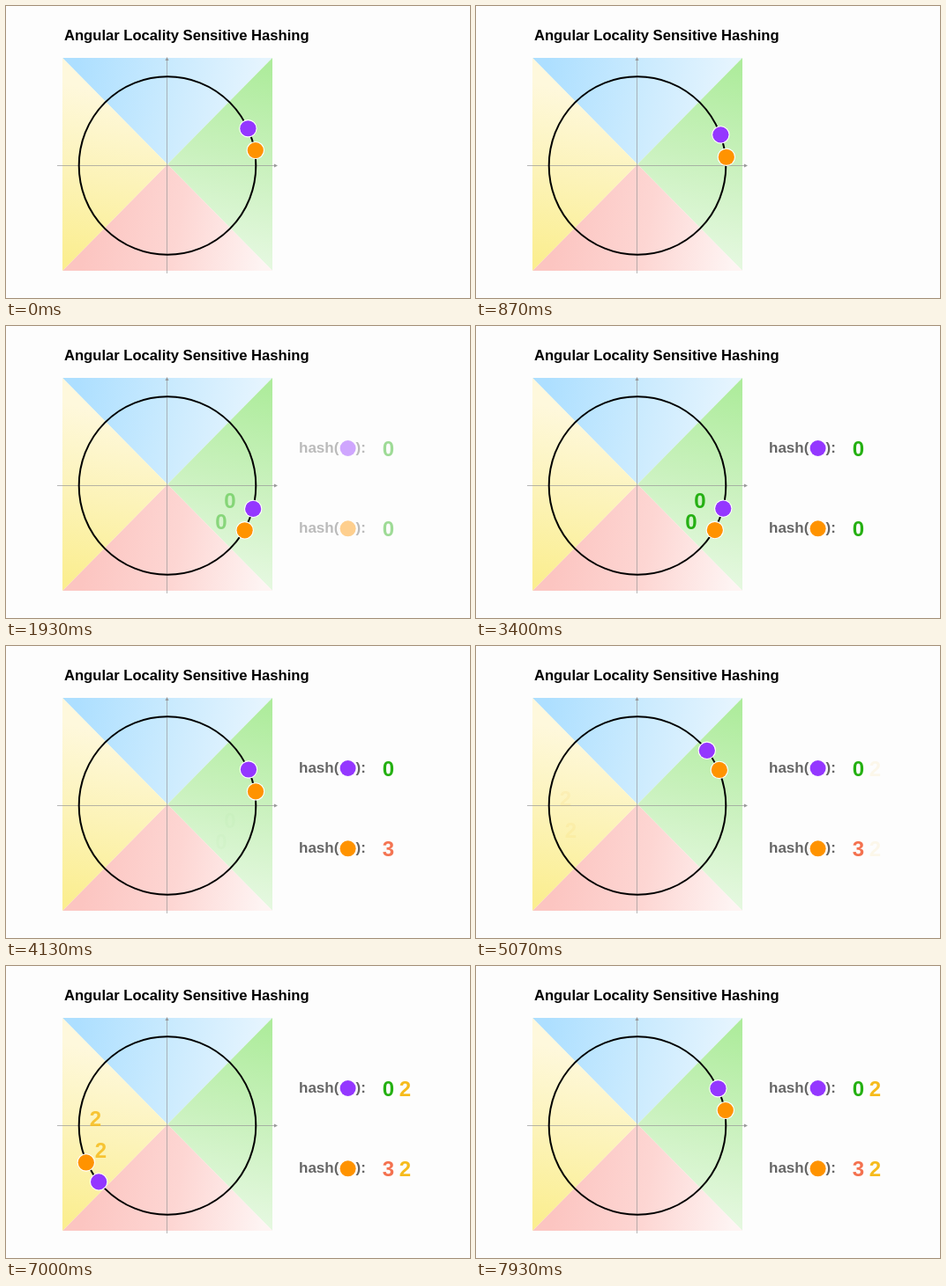
Animation of 526 by 332 pixels, one loop 8000 ms. Source, as an HTML page with a canvas:

```html
<!DOCTYPE html>
<html lang="en">
<head>
<meta charset="utf-8">
<title>Angular Locality Sensitive Hashing</title>
<style>
html, body { margin: 0; width: 100%; height: 100%; overflow: hidden; background: #fdfdfd; }
canvas { display: block; width: 526px; height: 332px; }
</style>
</head>
<body>
<canvas id="stage"></canvas>
<script>
const W = 526, H = 332, LOOP = 8000;
const CX = 183, CY = 181.5;
const PURPLE = '#9437ff', ORANGE = '#ff9300';
const GREEN = '#24b012', RED = '#f4714f', YELLOW = '#f6bb1c';
const FONT = '"Liberation Sans", Arial, sans-serif';

const canvas = document.getElementById('stage');
const ctx = canvas.getContext('2d');
const scale = window.devicePixelRatio || 1;
canvas.width = W * scale;
canvas.height = H * scale;

const clamp = x => Math.min(1, Math.max(0, x));
const ramp = (t, start, length) => clamp((t - start) / length);
const ease = x => x < 0.5 ? 4 * x ** 3 : 1 - 4 * (1 - x) ** 3;
const move = (t, start) => ease(ramp(t, start, 1000));

function sector(a, b, from, to, colors) {
  const g = ctx.createLinearGradient(...from, ...to);
  colors.forEach((c, i) => g.addColorStop(i / (colors.length - 1), c));
  ctx.fillStyle = g;
  ctx.beginPath();
  ctx.moveTo(...a);
  ctx.lineTo(...b);
  ctx.lineTo(183, 180);
  ctx.fill();
}

function text(str, x, y, size, color, alpha = 1, align = 'center') {
  if (alpha <= 0) return;
  ctx.globalAlpha = alpha;
  ctx.font = `bold ${size}px ${FONT}`;
  ctx.textAlign = align;
  ctx.fillStyle = color;
  ctx.fillText(str, x, y);
  ctx.globalAlpha = 1;
}

const digit = (d, x, y, color, alpha) => text(d, x, y, 24, color, alpha);

function disc(x, y, r, color, alpha = 1) {
  ctx.globalAlpha = alpha;
  ctx.beginPath();
  ctx.arc(x, y, r, 0, Math.PI * 2);
  ctx.fillStyle = color;
  ctx.fill();
  ctx.globalAlpha = 1;
}

function orbitDot(deg, r, color) {
  const a = deg * Math.PI / 180;
  const x = CX + r * Math.cos(a), y = CY + r * Math.sin(a);
  disc(x, y, 10.2, '#fff');
  disc(x, y, 9.1, color);
}

function arrow(x, y, dx, dy) {
  ctx.beginPath();
  ctx.moveTo(x, y);
  ctx.lineTo(x - 4 * dx - 2 * dy, y - 4 * dy - 2 * dx);
  ctx.lineTo(x - 4 * dx + 2 * dy, y - 4 * dy + 2 * dx);
  ctx.fill();
}

function drawBoard() {
  const tl = [64, 59], tr = [302, 59], br = [302, 301], bl = [64, 301];
  sector(tl, tr, [80, 70], [285, 105], ['#addfff', '#c9eafe', '#e5f4fe']);
  sector(tr, br, [300, 70], [250, 285], ['#aeec9c', '#c9f1bd', '#e5f8e0']);
  sector(br, bl, [90, 265], [290, 300], ['#fcc5c1', '#fdd6d3', '#fef4f3']);
  sector(bl, tl, [66, 290], [105, 95], ['#fbee90', '#fcf3b8', '#fef8dc']);

  ctx.strokeStyle = ctx.fillStyle = '#999';
  ctx.lineWidth = 0.7;
  ctx.beginPath();
  ctx.moveTo(58, 181.5);
  ctx.lineTo(305, 181.5);
  ctx.moveTo(182.5, 304);
  ctx.lineTo(182.5, 60);
  ctx.stroke();
  arrow(308, 181.5, 1, 0);
  arrow(182.5, 58, 0, -1);

  ctx.strokeStyle = '#000';
  ctx.lineWidth = 2;
  ctx.beginPath();
  ctx.ellipse(CX, CY, 100.3, 101.3, 0, 0, Math.PI * 2);
  ctx.stroke();
}

function hashLabel(y, color, alpha) {
  text('hash(', 332, y + 5, 17, '#666', alpha, 'left');
  text('):', 396.5, y + 5, 17, '#666', alpha, 'left');
  disc(387.6, y, 9, color, alpha);
}

function draw(t) {
  const out1 = move(t, 570), back1 = move(t, 3300);
  const out2 = move(t, 4797), back2 = move(t, 6670);
  const shown = ramp(t, 1500, 980);

  ctx.setTransform(scale, 0, 0, scale, 0, 0);
  ctx.fillStyle = '#fdfdfd';
  ctx.fillRect(0, 0, W, H);
  text('Angular Locality Sensitive Hashing', 66, 39, 16.6, '#000', 1, 'left');
  drawBoard();

  const near1 = shown * (1 - back1), near2 = out2 * (1 - back2);
  digit('0', 254, 207, GREEN, near1);
  digit('0', 244, 231, GREEN, near1);
  digit('2', 101.5, 182, YELLOW, near2);
  digit('2', 107.5, 218, YELLOW, near2);

  // The second trip completes a full counterclockwise turn.
  const turn = 40 * (out1 - back1) - 166.5 * out2 - 193.5 * back2;
  orbitDot(-24.8 + turn, 100.7, PURPLE);
  orbitDot(-9.9 + turn, 101.3, ORANGE);

  hashLabel(139, PURPLE, shown);
  hashLabel(230.3, ORANGE, shown);
  digit('0', 433.3, 148, GREEN, shown);
  digit('0', 433.3, 239.3, GREEN, near1);
  digit('3', 433.3, 239.3, RED, back1);
  digit('2', 452.5, 148, YELLOW, out2);
  digit('2', 452.5, 239.3, YELLOW, out2);
}

const begin = performance.now();
function tick() {
  draw((performance.now() - begin) % LOOP);
  requestAnimationFrame(tick);
}
tick();
</script>
</body>
</html>
```
